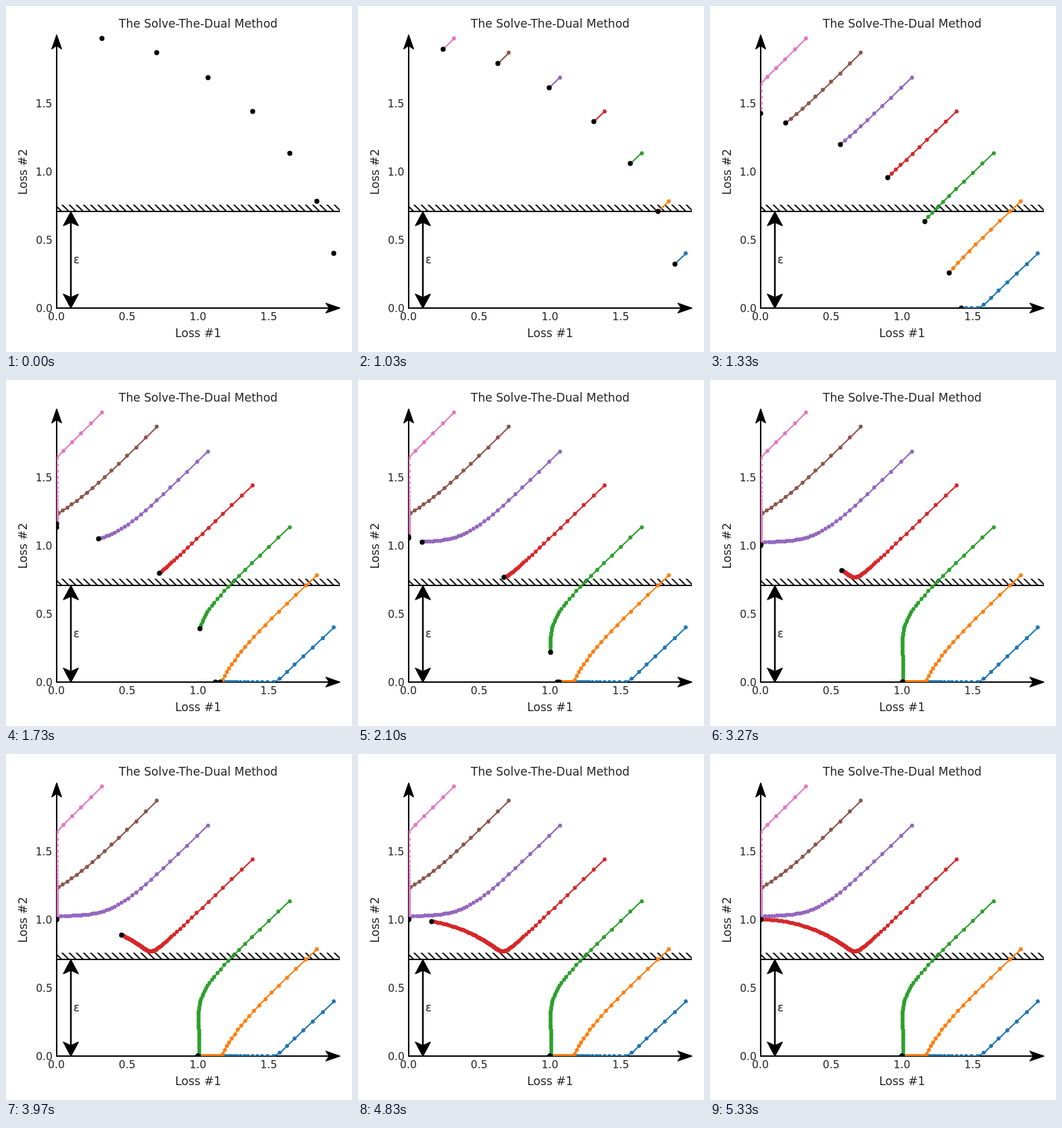
An HTML page with a canvas that plays this animation: 512 px wide and 512 px high, repeating every 7.66 s.

```html
<!DOCTYPE html>
<html lang="en">
<head>
<meta charset="utf-8">
<title>The Solve-The-Dual Method</title>
<style>
html, body { margin: 0; width: 100%; height: 100%; overflow: hidden; background: #fff; }
svg, canvas { position: absolute; left: 0; top: 0; }
canvas { left: 75px; top: 43px; }
text { font: 17.07px "DejaVu Sans", sans-serif; fill: #262626; text-anchor: middle; }
.tick text { font-size: 15.64px; }
.y text { text-anchor: end; }
.line { fill: none; stroke: #000; stroke-width: 2.1; }
.head { stroke: #000; stroke-width: 1.5; stroke-linejoin: round; }
</style>
</head>
<body>
<svg width="512" height="512" viewBox="0 0 512 512">
  <defs>
    <pattern id="hatch" x="83" y="294" width="10.6" height="10.6" patternUnits="userSpaceOnUse">
      <path d="M-2-2L14 14M-12.6-2L3.4 14M8.6-2L24.6 14" stroke="#000" stroke-width="1.9"/>
    </pattern>
    <path id="head" d="M0 0L7.1 20.5L0 15.5L-7.1 20.5Z"/>
    <path id="bigHead" d="M0 0L11 20.5L0 15.5L-11 20.5Z"/>
  </defs>
  <rect x="75" y="294" width="419" height="10" fill="url(#hatch)"/>
  <path class="line" d="M75 304H494" style="stroke-width:2"/>
  <path class="line" d="M75 55V447H482"/>
  <path class="line" d="M96 316V436" style="stroke-width:2.5"/>
  <g class="head">
    <use href="#head" x="75" y="43"/>
    <use href="#head" transform="translate(494 447) rotate(90)"/>
    <use href="#bigHead" x="96" y="304.5"/>
    <use href="#bigHead" transform="translate(96 447) rotate(180)"/>
  </g>
  <text x="284.5" y="32">The Solve-The-Dual Method</text>
  <text x="284.3" y="490">Loss #1</text>
  <text transform="translate(31 245.5) rotate(-90)">Loss #2</text>
  <text x="104.3" y="381">ε</text>
  <g class="tick">
    <text x="74.5" y="465">0.0</text>
    <text x="179.3" y="465">0.5</text>
    <text x="284" y="465">1.0</text>
    <text x="388.7" y="465">1.5</text>
  </g>
  <g class="tick y">
    <text x="69" y="453">0.0</text>
    <text x="69" y="352">0.5</text>
    <text x="68.5" y="251">1.0</text>
    <text x="68.5" y="150">1.5</text>
  </g>
</svg>
<canvas width="419" height="404"></canvas>
<script>
const ctx = document.querySelector('canvas').getContext('2d');
const COLORS = ['#1f77b4', '#ff7f0e', '#2ca02c', '#d62728', '#9467bd', '#8c564b', '#e377c2'];
const STEPS = 130, RATE = 0.02, START = 1000, LOOP = 7660;

// Gradient descent on L1 + L2, with (L1, L2) = (1 + u²)(cos a, sin a)
function descend(a) {
  const path = [];
  let u = 1;
  for (let i = 0; i <= STEPS; i++) {
    const r = 1 + u * u, c = Math.cos(a), s = Math.sin(a);
    path.push([209.5 * r * c - 0.2, 404.1 - 202 * r * s]);
    u -= RATE * 2 * u * (c + s);
    a = Math.min(Math.PI / 2, Math.max(0, a - RATE * r * (c - s)));
  }
  return path;
}
const paths = COLORS.map((_, i) => descend(0.2014 * (i + 1)));

// Thirty steps a second, on a 10 ms clock
const stepTime = k => START + Math.round(k * 10 / 3) * 10;

// Markers snap to whole pixels
function dot([x, y], radius, color) {
  ctx.fillStyle = color;
  ctx.beginPath();
  ctx.arc(Math.round(x), Math.round(y), radius, 0, 2 * Math.PI);
  ctx.fill();
}

function draw(t) {
  let k = 0;
  while (k < STEPS && stepTime(k + 1) <= t) k++;
  ctx.clearRect(0, 0, 419, 404);
  ctx.lineWidth = 2.1;
  ctx.lineJoin = 'round';
  paths.forEach((path, i) => {
    const trail = path.slice(0, k + 1);
    ctx.strokeStyle = COLORS[i];
    ctx.beginPath();
    trail.forEach(p => ctx.lineTo(...p));
    ctx.stroke();
    trail.forEach(p => dot(p, 2.9, COLORS[i]));
  });
  paths.forEach(path => dot(path[k], 3.7, '#000'));
}

const t0 = performance.now();
function frame() {
  draw((performance.now() - t0) % LOOP);
  requestAnimationFrame(frame);
}
frame();
</script>
</body>
</html>
```
